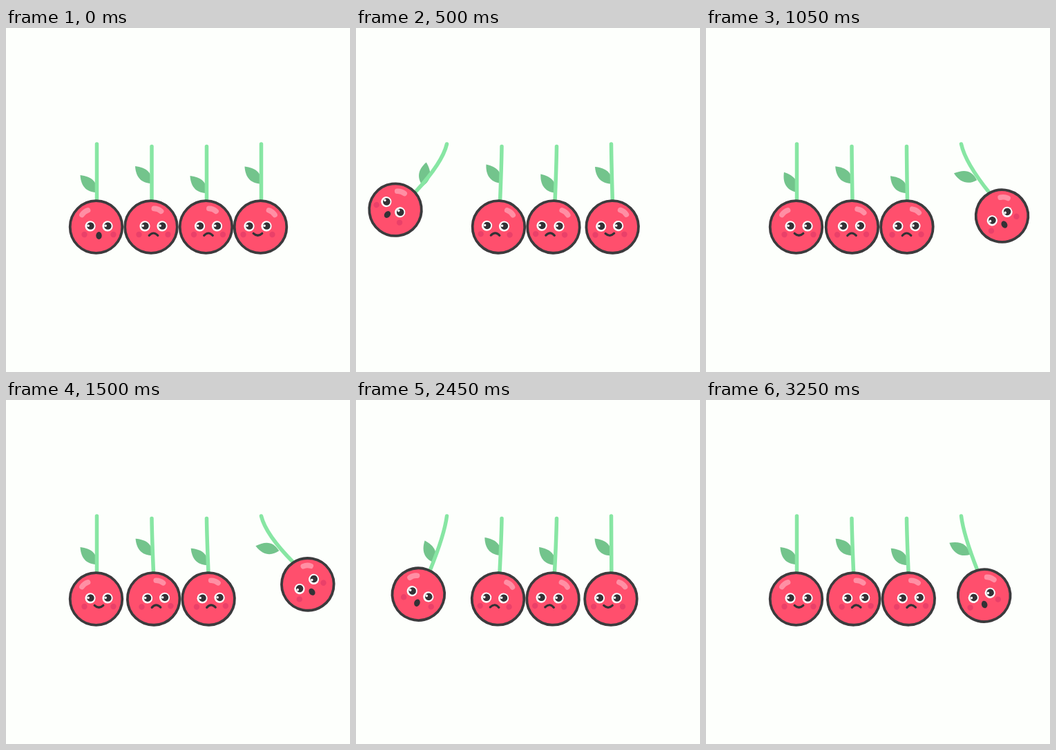
Recreate the animation shown at these times as an HTML page. Size 498 px wide and 498 px high, loop 3.3 s.

```html
<!DOCTYPE html>
<html lang="en">
<head>
<meta charset="utf-8">
<title>Cherry cradle</title>
<style>
  html, body { margin: 0; width: 100%; height: 100%; overflow: hidden; background: #fdfffc; }
  svg { display: block; width: 498px; height: 498px; }
  .stem { fill: none; stroke: #87e6a3; stroke-width: 5.5; stroke-linecap: round; }
  .leaf { fill: #73c48c; }
  .skin { fill: #ff4f6d; stroke: #3b3b3d; stroke-width: 3.8; }
  .shine { fill: none; stroke: #ff8fa4; stroke-width: 7.6; stroke-linecap: round; }
  .blush { fill: #ea4069; }
  .white { fill: #fff; }
  .dark { fill: #333236; }
  .line { fill: none; stroke: #333236; stroke-width: 3.2; stroke-linecap: round; }
</style>
</head>
<body>
<svg viewBox="0 0 498 498" xmlns="http://www.w3.org/2000/svg">
  <defs>
    <g id="eye">
      <circle class="white" r="7.6"/>
      <circle class="dark" cx=".4" cy="-.3" r="5.3"/>
      <circle class="white" cx="-2.9" cy="-.6" r="1.8"/>
    </g>
    <g id="eyes">
      <circle class="blush" cx="-21" cy="11" r="4.2"/>
      <circle class="blush" cx="21" cy="11" r="4.2"/>
      <use href="#eye" x="-12.5" y="-1.2"/>
      <use href="#eye" x="12.5" y="-1.2"/>
    </g>
    <ellipse id="gasp" class="dark" cy="12.5" rx="4.2" ry="5.4"/>
    <path id="sad" class="line" d="M-6.3 12.4Q0 5.6 6.3 12.4"/>
    <path id="smile" class="line" d="M-6.3 9.3Q0 15.3 6.3 9.3"/>
  </defs>
  <g id="stage"></g>
</svg>
<script>
const CYCLE = 1650, HIT = 860, STEP = 50;
const PIVOT_Y = 167, REACH = 121, SWING = 73.5, STEM_END = 250;
const DEG = 180 / Math.PI;
const stage = document.getElementById('stage');

const part = (t, from, to) => Math.min(1, Math.max(0, (t - from) / (to - from)));
const smooth = (t, from, to) => (1 - Math.cos(Math.PI * part(t, from, to))) / 2;
const bump = (t, from, to) => Math.sin(Math.PI * part(t, from, to)) ** 2;
const bezier = (a, b, c, u) => (1 - u) ** 2 * a + 2 * u * (1 - u) * b + u * u * c;

// Flies out fast, hangs near the peak, then drops hard
const swing = (t, start, peak, end) =>
  SWING * (1 - (1 - part(t, start, peak)) ** 3 - part(t, peak, end) ** 5);

// Quarter turn of the slow drift that follows each hit
const drift = t => Math.PI / 2 * (t < HIT ? t / HIT : (t - HIT) / (CYCLE - HIT));

const left = {
  mood: t => t < HIT ? 'gasp' : 'smile',
  dx: t => -swing(t, 30, 450, HIT),
  face: t => 4 - 9 * bump(t, 60, 920),
  leaf: t => 15 * bump(t, 0, 900) + 12 * bump(t, HIT, 1300),
  shine: -30, grip: 1.27
};
const middle = {
  mood: () => 'sad',
  dx: t => (t < HIT ? -4.5 : 3.8) * Math.sin(drift(t)),
  face: t => 3.5 - 8 * smooth(t, 0, 230) + 8 * smooth(t, 900, 1200),
  leaf: t => 7 * bump(t, 0, 700),
  shine: 28, grip: 1
};
const right = {
  mood: t => t < HIT ? 'smile' : 'gasp',
  dx: t => t < HIT
    ? 4.4 * part(t, 0, STEP) * Math.cos(drift(t))
    : swing(t, HIT, 1300, 1640),
  face: t => -4 + 5.5 * bump(t, 960, 1690),
  leaf: () => 0,
  shine: 30, grip: 1
};

const cherries = [
  { ...left, x: 130.5, top: 168, leafY: 238 },
  { ...middle, x: 210, top: 171.5, leafY: 225 },
  { ...middle, x: 289.5, top: 171.5, leafY: 239 },
  { ...right, x: 368.5, top: 168, leafY: 225.5 }
];

for (const c of cherries) {
  const g = document.createElementNS('http://www.w3.org/2000/svg', 'g');
  g.innerHTML = `
    <path class="leaf" d="M0 0C-12 0-23-6-24-25C-8-23 1-16 0 0Z"/>
    <path class="stem"/>
    <g class="body">
      <circle class="skin" r="37.8"/>
      <path class="shine" d="M-5.5-26.4Q0-28.5 5.5-26.4"/>
      <g class="face"><use href="#eyes"/><use class="mouth"/></g>
    </g>`;
  stage.append(g);
  for (const name of ['leaf', 'stem', 'body', 'shine', 'face', 'mouth'])
    c[name + 'El'] = g.querySelector('.' + name);
}

function pose(c, t) {
  const dx = c.dx(t), angle = -Math.asin(dx / REACH), turn = angle * DEG;
  const x = c.x + dx, y = PIVOT_Y + REACH * Math.cos(angle);
  const topX = c.x + 1, grip = angle * c.grip;
  const endX = x + 1 + 38 * Math.sin(grip), endY = y - 38 * Math.cos(grip);
  const midX = topX + (endX - topX) * .14, midY = c.top + 27;
  c.stemEl.setAttribute('d', `M${topX} ${c.top}Q${midX} ${midY} ${endX} ${endY}`);

  // The leaf rides at a fixed share of the stem
  const u = (c.leafY - c.top) / (STEM_END - c.top);
  const lift = c.leafY - bezier(c.top, midY, STEM_END, u);
  const leafX = bezier(topX, midX, endX, u);
  const leafY = bezier(c.top, midY, endY, u) + lift;
  c.leafEl.setAttribute('transform', `translate(${leafX} ${leafY}) rotate(${turn + c.leaf(t)})`);

  const face = c.face(t);
  c.bodyEl.setAttribute('transform', `translate(${x} ${y}) rotate(${turn})`);
  c.shineEl.setAttribute('transform', `rotate(${c.shine - 2 * face})`);
  c.faceEl.setAttribute('transform', `translate(${face} 0)`);
  c.mouthEl.setAttribute('href', '#' + c.mood(t));
}

const begin = performance.now();
function draw() {
  const time = Math.max(0, performance.now() - begin);
  const t = Math.floor(time / STEP) * STEP % CYCLE;
  for (const c of cherries) pose(c, t);
  requestAnimationFrame(draw);
}
draw();
</script>
</body>
</html>
```
